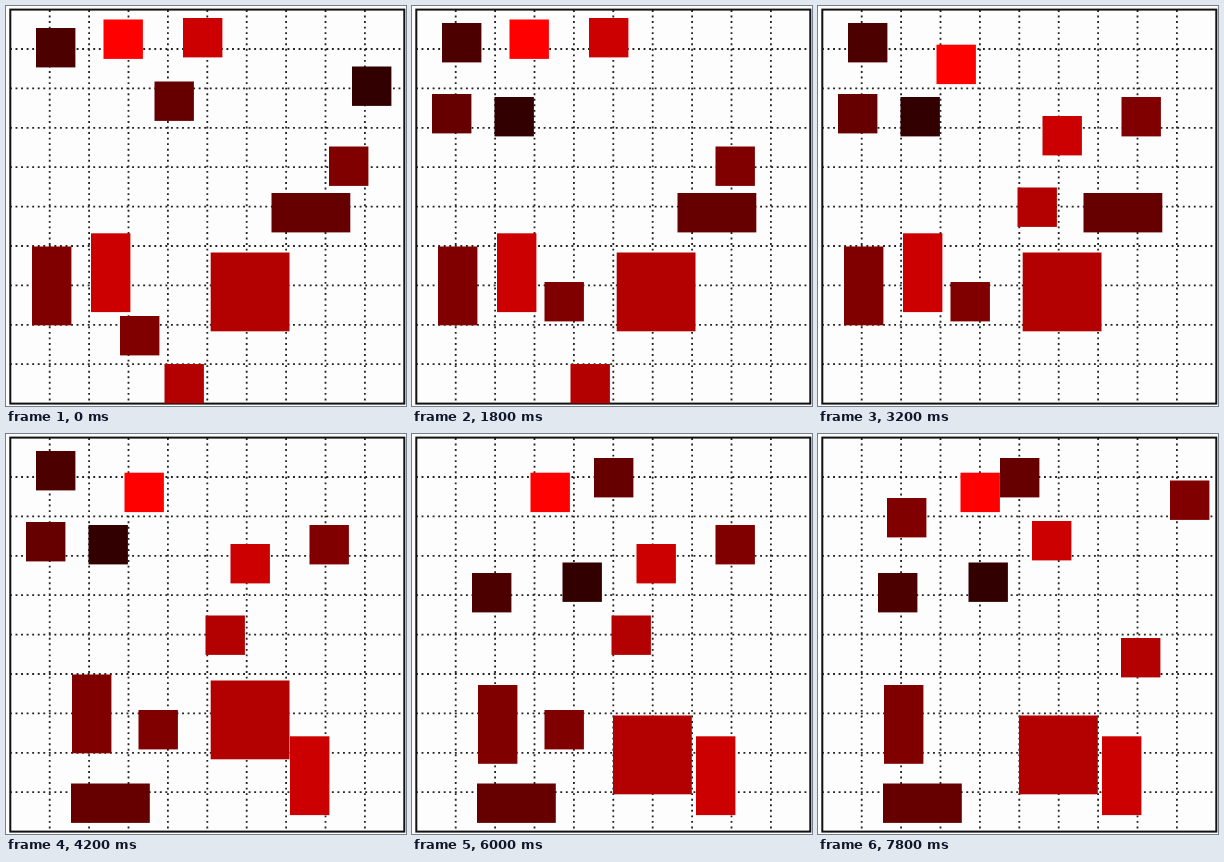
Write an HTML page that moves like this. It is 400 px wide and 400 px high and loops after 8 s.

```html
<!DOCTYPE html>
<html lang="en">
<head>
<meta charset="utf-8">
<title>Blocks on a grid</title>
<style>
  html, body { margin: 0; height: 100%; overflow: hidden; background: #fdfdfd; }
  svg { display: block; width: 100vw; height: 100vh; filter: blur(.5px); }
  path { fill: none; stroke: #222; stroke-width: 1.8; stroke-dasharray: 1.9 3.65; }
  #frame { fill: none; stroke: #111; stroke-width: 2; }
</style>
</head>
<body>
<svg viewBox="0 0 400 400">
  <path id="grid"/>
  <rect id="frame" x="4.3" y="3.6" width="394" height="394"/>
  <g id="blocks"></g>
</svg>
<script>
const STEP = 200, LOOP = 8000, UNIT = 39.4;
const layer = document.getElementById("blocks");
const blocks = [];

const set = (el, attrs) => {
  for (const key in attrs) el.setAttribute(key, attrs[key]);
};

// Adds a block of the given red level (0 to 10) that visits the places in turn
const shape = (cols, rows) => (level, ...places) => {
  const el = document.createElementNS("http://www.w3.org/2000/svg", "rect");
  set(el, { fill: `rgb(${level * 10}% 0% 0%)`, width: cols * UNIT, height: rows * UNIT });
  layer.append(el);
  blocks.push({ el, places });
};
const small = shape(1, 1), wide = shape(2, 1), tall = shape(1, 2), big = shape(2, 2);

// The order here is the order of turns
small(2, [346, 60.5], [82.5, 91], [150.5, 128.5]);
small(3, [30, 22], [30, 17], [60, 139]);
small(4, [148.5, 75.5], [20, 88], [182, 24]);
small(5, [114, 310], [132.5, 276], [352, 46.5]);
small(5, [323, 140.5], [303.5, 91], [69, 64]);
small(7, [158.5, 358], [199.5, 181.5], [303, 204]);
small(8, [177, 12], [224.5, 110], [214, 87]);
small(10, [97.5, 13.5], [118.5, 38.7], [142.5, 38.7]);
wide(4, [265.5, 187], [65, 349.5]);
tall(8, [85, 227.3], [284, 302.3]);
tall(5, [26, 240.5], [66, 251]);
big(7, [204.7, 246.5], [201, 281.5]);

let d = "";
for (let i = 1; i < 10; i++)
  d += `M${4.3 + i * UNIT} 4v393M4 ${3.6 + i * UNIT}h394`;
set(document.getElementById("grid"), { d });

// Each block in turn jumps sideways, then one step later up or down
function draw(time) {
  const n = Math.floor(time % LOOP / STEP);
  const round = blocks.length * 2;
  blocks.forEach(({ el, places }, i) => {
    const at = delay => places[Math.floor((n - 1 - 2 * i - delay) / round) + 1];
    set(el, { x: at(0)[0], y: at(1)[1] });
  });
}

const start = performance.now();
function tick() {
  draw(performance.now() - start);
  requestAnimationFrame(tick);
}
tick();
</script>
</body>
</html>
```
